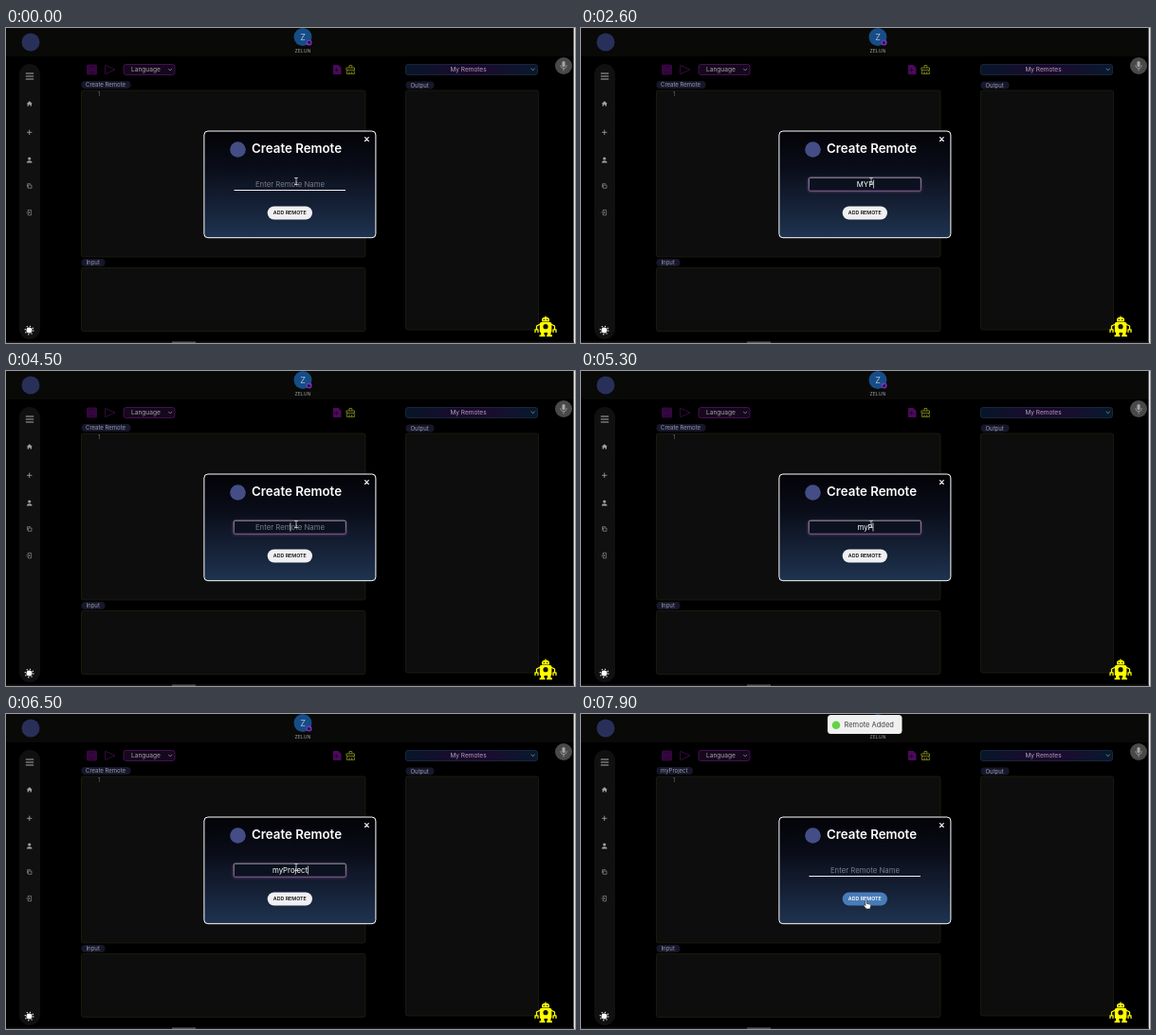
These frames come from a looping animation (600x333 px, 8 s). An HTML page:

```html
<!DOCTYPE html>
<html lang="en">
<head>
<meta charset="utf-8">
<title>Create Remote</title>
<style>
  html, body { margin: 0; width: 100%; height: 100%; overflow: hidden; background: #000; }
  svg { display: block; width: 100vw; height: 100vh; }
  text { font-family: Inter, "Open Sans", sans-serif; }
  .mid { text-anchor: middle; }
  .panel { fill: #0d0d0d; stroke: #212410; stroke-width: .7; }
  .pill { fill: #17172b; }
  .label { font-size: 6px; fill: #9a9aae; }
  .line { fill: none; stroke-linecap: round; stroke-linejoin: round; }
</style>
</head>
<body>
<svg viewBox="0 0 600 333">
  <defs>
    <linearGradient id="modalFill" x2="0" y2="1">
      <stop stop-color="#030307"/><stop offset=".35" stop-color="#0a0d19"/><stop offset="1" stop-color="#1f3350"/>
    </linearGradient>
    <linearGradient id="remotesFill">
      <stop stop-color="#071629"/><stop offset=".5" stop-color="#200830"/><stop offset="1" stop-color="#071a2d"/>
    </linearGradient>
    <linearGradient id="focusLine" x2="0" y2="1">
      <stop stop-color="#aaa5ac"/><stop offset="1" stop-color="#8d6b9d"/>
    </linearGradient>
    <filter id="glow" x="-10%" y="-60%" width="120%" height="220%"><feGaussianBlur stdDeviation="1.2"/></filter>
  </defs>

  <rect width="600" height="333" fill="#000"/>
  <rect width="600" height="30" fill="#090907"/>
  <rect x="598.6" width="1.4" height="333" fill="#e8e8e8"/>
  <rect y="331.5" width="598.6" height="1.5" fill="#171717"/>
  <rect x="175" y="331.5" width="25" height="1.5" fill="#555"/>

  <!-- Top bar -->
  <circle cx="26" cy="15" r="9.5" fill="#28305a"/>
  <circle cx="313" cy="9.5" r="9.5" fill="#164d86"/>
  <text class="mid" x="313" y="12.7" font-size="9" fill="#a9bdd2">Z</text>
  <circle cx="319.6" cy="15.5" r="3" fill="#8130c4"/>
  <path id="status" d="M317.8 15.5a1.8 1.8 0 1 1 2.5 1.7z" fill="#191b42"/>
  <text class="mid" x="313" y="26" font-size="5.1" fill="#a2a2a2">ZELUN</text>

  <!-- Sidebar -->
  <rect x="14" y="38" width="22" height="291" rx="11" fill="#101010"/>
  <g class="line" stroke="#aaa" stroke-width="1">
    <path d="M21.200 48h7.600M21.200 51h7.600M21.200 54h7.600"/>
    <path d="M22.400 110.300h4.600M24.700 108v4.600" stroke-width=".8"/>
  </g>
  <g fill="#a0a0a0">
    <path d="M21.800 80l3-2.800 3 2.800h-.8v2.500h-1.500v-1.600h-1.400v1.600h-1.500V80z"/>
    <circle cx="24.700" cy="138" r="1.600"/>
    <path d="M21.800 142.500c0-3 5.800-3 5.800 0z"/>
  </g>
  <g class="line" stroke="#8d8d8d" stroke-width=".7">
    <path d="M23.800 166h3.200v3.300h-3.200zM22.500 168v-3.300h3.200"/>
    <path d="M23.200 193.600v-1.200h3.400v5.400h-3.400v-1.200M21.800 195.100h3M23.800 194l1.100 1.100-1.100 1.100"/>
  </g>
  <circle cx="24.500" cy="319.500" r="3" fill="#fff"/>
  <circle cx="24.500" cy="319.500" r="4.300" fill="none" stroke="#fff" stroke-width="1.200" stroke-dasharray="1.100 2.277"/>

  <!-- Toolbar -->
  <rect x="85" y="38.500" width="11" height="11" rx="1.500" fill="#35063f"/>
  <path d="M88 41h5M88 47h5" stroke="#240529" stroke-width=".8"/>
  <path class="line" d="M105 39.500l10 4.500-10 4.500z" stroke="#3d0d46" stroke-width=".9"/>
  <rect x="124" y="38.500" width="54" height="11" rx="2.500" fill="#15081c" stroke="#541465" stroke-width=".8"/>
  <text x="132" y="46.300" font-size="6.600" fill="#aaa4ad">Language</text>
  <path class="line" d="M171.500 43.200l1.700 1.700 1.700-1.700" stroke="#aaa" stroke-width=".7"/>
  <path d="M345 39h5.500l3 3v7H345z" fill="#4c095a"/>
  <path class="line" d="M347 44.500h3M348.500 43v3" stroke="#16051a" stroke-width=".8"/>
  <path class="line" d="M362 41.800v-2.300h2.800v2.300M359.300 42h8.200v2.400h-8.200zM360 44.400l-.8 4h8.400l-.8-4M362 48.300v-2M364.700 48.300v-2" stroke="#81861c" stroke-width=".9"/>
  <rect x="421.500" y="38.500" width="139" height="11" rx="2.500" fill="url(#remotesFill)" stroke="#22324c" stroke-width=".7"/>
  <text class="mid" x="487.500" y="46.300" font-size="6.500" fill="#aaa6b1">My Remotes</text>
  <path class="line" d="M554 43l1.700 1.700 1.700-1.700" stroke="#aaa" stroke-width=".7"/>
  <circle cx="588" cy="40" r="9" fill="#494949"/>
  <rect x="586.400" y="35" width="3.200" height="6.300" rx="1.600" fill="#a5a5a5"/>
  <path class="line" d="M584.800 39.500c0 4.600 6.400 4.600 6.400 0M588 43v2" stroke="#a5a5a5" stroke-width=".8"/>

  <!-- Panels -->
  <rect class="panel" x="79.500" y="66" width="299.500" height="176" rx="2"/>
  <rect class="panel" x="79.500" y="253.500" width="299.500" height="67" rx="2"/>
  <rect class="panel" x="421.500" y="66" width="140" height="253" rx="2"/>
  <text x="97" y="72" font-size="5.500" fill="#777">1</text>
  <rect id="namePill" class="pill" x="79.500" y="56" width="52" height="8" rx="4"/>
  <text id="remoteName" class="label" x="84" y="62.100"></text>
  <rect class="pill" x="79.500" y="244" width="25" height="8" rx="4"/>
  <text class="label" x="84.500" y="250.100">Input</text>
  <rect class="pill" x="421.500" y="56.500" width="30" height="8" rx="4"/>
  <text class="label" x="426.500" y="62.600">Output</text>

  <!-- Robot -->
  <g fill="#ff0">
    <path d="M565 310.500v-2.500c0-3.500 8-3.500 8 0v2.500zM568.400 304.500h1.200v2h-1.200z"/>
    <rect x="562.800" y="311" width="12.600" height="11" rx="1.500"/>
    <path d="M564 322h3.500v2.500h1v1.700h-6v-1.700h1.500zM571 322h3.500v2.500h1.500v1.700h-6v-1.700h1z"/>
    <path class="line" d="M562.500 313.500l-3 1.500v3M575.500 313.500l3 1.500v3M558 321.500v-2.700h3v2.700M577 321.500v-2.700h3v2.700" stroke="#ff0" stroke-width="1.300"/>
  </g>
  <path d="M567.300 308.300h.01M570.700 308.300h.01" class="line" stroke="#111" stroke-width="1.400"/>
  <circle cx="569" cy="315.700" r="2.600" fill="#161600"/>

  <!-- Dialog -->
  <rect x="208.900" y="109" width="181" height="112.700" rx="4" fill="url(#modalFill)" stroke="#fff" stroke-width="1"/>
  <path class="line" d="M378.500 115.700l3.800 3.800M382.300 115.700l-3.800 3.800" stroke="#fff" stroke-width="1.100"/>
  <circle cx="244.500" cy="128.500" r="8.300" fill="#454d86"/>
  <text class="mid" x="306.500" y="132.400" font-size="13.300" font-weight="600" fill="#fff">Create Remote</text>
  <path id="underline" d="M240.500 171.500h117.500" stroke="#f2f2f5" stroke-width="1.200"/>
  <g id="focus">
    <rect x="240.300" y="159" width="118" height="13.500" rx="2" fill="none" stroke="#70407c" stroke-width="1.600" filter="url(#glow)"/>
    <rect x="240.300" y="158.200" width="118" height="14" rx="1.500" fill="#0c111f" stroke="url(#focusLine)" stroke-width=".9"/>
  </g>
  <text id="entry" class="mid" x="299.500" y="167.600" font-size="7.800"></text>
  <path id="caret" d="M0 160.500v9" stroke="#fff" stroke-width=".7"/>
  <rect id="button" x="275.700" y="188.500" width="47.300" height="14" rx="7"/>
  <text id="buttonText" class="mid" x="299.300" y="197.400" font-size="5.300" font-weight="600">ADD REMOTE</text>

  <g id="toast">
    <rect x="260" y="2" width="78.500" height="20" rx="3.500" fill="#000" opacity=".5" filter="url(#glow)"/>
    <rect x="260" y="1" width="78.500" height="20" rx="3.500" fill="#f1f1f1"/>
    <circle cx="269" cy="11.700" r="4.300" fill="#64d345"/>
    <text x="277.500" y="14.200" font-size="7.500" fill="#444">Remote Added</text>
  </g>

  <g id="pointer">
    <path id="beam" class="line" d="M-1.500-3.500h3M0-3.500v7M-1.500 3.500h3" stroke="#d8d8d8" stroke-width=".8"/>
    <path id="hand" d="M-1.500-4.500c0-1 1.500-1 1.500 0v3l3 .6c1 .2 1.200.8 1 1.600L3.300 4h-4L-3.400.600c-.4-.8.600-1.300 1.200-.7l.7.700z" fill="#fff" stroke="#222" stroke-width=".6"/>
  </g>
</svg>
<script>
const $ = id => document.getElementById(id);
const LOOP = 8000, FOCUS = 500, LEAVE = 6700, ARRIVE = 7100, CLICK = 7400, ADDED = 7700;
// Time of each edit and the text it leaves in the field
const edits = [[0, ""], [900, "M"], [1200, "MY"], [1500, "MYP"],
  [3000, "MY"], [3200, "M"], [3400, ""],
  [4600, "m"], [4800, "my"], [5100, "myP"], [5500, "myPr"], [5600, "myPro"],
  [5800, "myProj"], [5900, "myProje"], [6100, "myProjec"], [6300, "myProject"], [ADDED, ""]];

const clamp = v => Math.max(0, Math.min(1, v));
const show = (id, on) => $(id).setAttribute("visibility", on ? "visible" : "hidden");

function draw(t) {
  const [editTime, value] = edits.findLast(e => e[0] <= t);
  const focused = t >= FOCUS && t < CLICK;
  show("focus", focused);
  show("underline", !focused);

  const entry = $("entry");
  entry.textContent = value || "Enter Remote Name";
  entry.setAttribute("fill", value ? "#fff" : "#777b87");
  const half = value ? entry.getComputedTextLength() / 2 : 0;
  $("caret").setAttribute("transform", `translate(${299.9 + half})`);
  show("caret", focused && (t - Math.max(FOCUS, editTime)) % 1000 < 500);

  const move = clamp((t - LEAVE) / (ARRIVE - LEAVE));
  const ease = move * move * (3 - 2 * move);
  const y = 162 + 40 * ease;
  const hover = y > 188.5;
  $("pointer").setAttribute("transform", `translate(${306 - 4.5 * ease} ${y})`);
  show("beam", !hover);
  show("hand", hover);
  $("button").setAttribute("fill", hover ? "#487cb9" : "#f0f0f2");
  $("buttonText").setAttribute("fill", hover ? "#fff" : "#111");

  const added = t >= ADDED;
  $("remoteName").textContent = added ? "myProject" : "Create Remote";
  $("namePill").setAttribute("width", added ? 38.5 : 52);
  const slide = (1 - clamp((t - ADDED) / 200)) ** 3;
  $("toast").setAttribute("transform", `translate(0 ${-24 * slide})`);
  show("toast", added);
  $("status").setAttribute("transform", `rotate(${t * .36} 319.6 15.5)`);
}

const start = performance.now();
function tick() {
  draw((performance.now() - start) % LOOP);
  requestAnimationFrame(tick);
}
tick();
</script>
</body>
</html>
```
